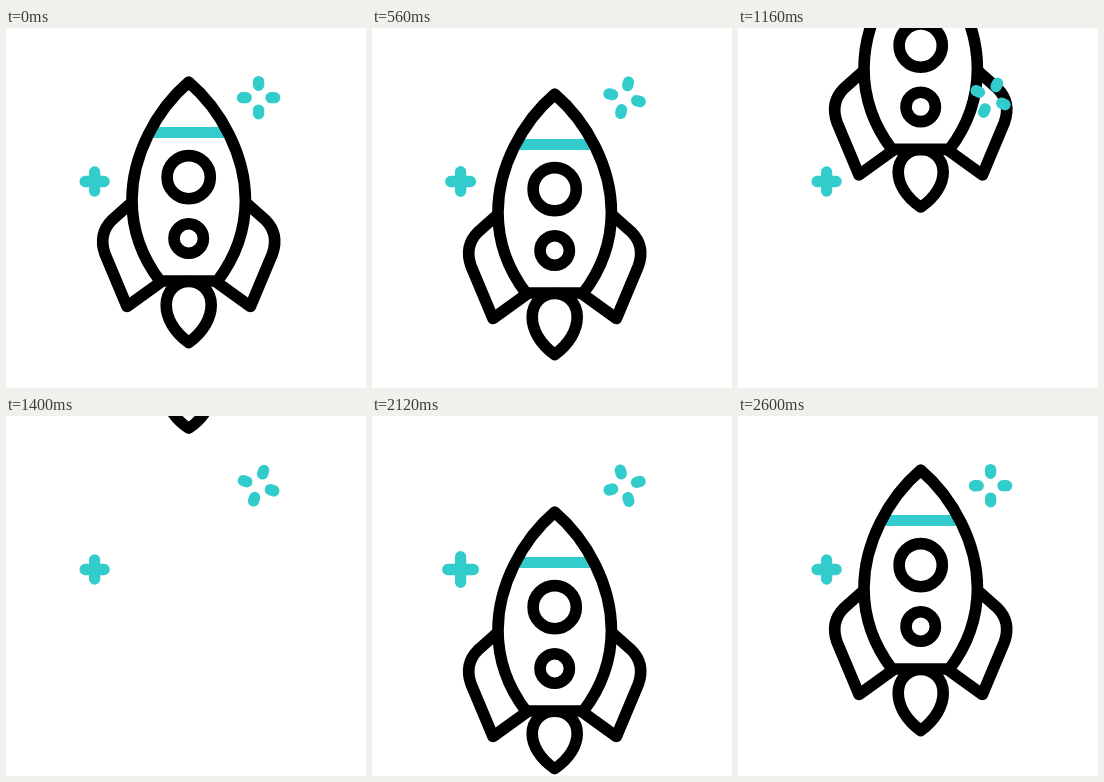
Animation of 360x360 px, one loop 2.76 s. Source, as an HTML page:

```html
<!DOCTYPE html>
<html lang="en">
<head>
<meta charset="utf-8">
<title>Rocket</title>
<style>
  html, body { margin: 0; width: 100%; height: 100%; overflow: hidden; background: #fff; }
  svg { display: block; width: 100%; height: 100%; }
</style>
</head>
<body>
<svg viewBox="0 0 360 360" fill="none" stroke="#000" stroke-width="11.6" stroke-linecap="round" stroke-linejoin="round">
  <g id="rocket">
    <path d="M147 104.5H218" stroke="#3cc" stroke-width="11" stroke-linecap="butt"/>
    <path d="M182.7 54.2C150 82 126 128 126 172C126 204 138 232 154 253H211.4C227.4 232 239.4 204 239.4 172C239.4 128 215.4 82 182.7 54.2Z"/>
    <path id="fin" d="M124 176L106 192Q92 206 99 226L121 278.5L155 254"/>
    <use href="#fin" transform="matrix(-1 0 0 1 365.4 0)"/>
    <circle cx="182.7" cy="149.2" r="21.6"/>
    <circle cx="182.7" cy="210.5" r="14.7"/>
    <path id="flame" d="M182.7 314.5C168.2 304 160.2 290 160.2 277C160.2 263 170.2 253.5 182.7 253.5C195.2 253.5 205.2 263 205.2 277C205.2 290 197.2 304 182.7 314.5Z"/>
  </g>
  <g stroke="#3cc" stroke-width="11.3">
    <path id="plus"/>
    <path id="spark" d="M0 -16.1V-12.4M0 16.1V12.4M-16.1 0H-12.4M16.1 0H12.4"/>
  </g>
</svg>
<script>
const LOOP = 2760, STEP = 40, END = 2600;
const [rocket, flame, plus, spark] =
  ['rocket', 'flame', 'plus', 'spark'].map(id => document.getElementById(id));

const smooth = (a, b, t) => {
  const x = Math.min(1, Math.max(0, (t - a) / (b - a)));
  return x * x * (3 - 2 * x);
};

// Dip and launch off the top, then return from below and settle.
function rocketY(t) {
  const s = t / 1000;
  if (t < 1500) return 165.3 * s ** 2 - 226.8 * s ** 3;
  return 207 * Math.max(0, (2460 - t) / 660) ** 2.405;
}

// One full turn, eased in and out.
function sparkAngle(t) {
  const x = t / 1350;
  return 180 * (x < 1 ? x ** 2.9 : 2 - (2 - x) ** 2.9);
}

// Half length of the plus arms, stretched once every half turn.
function plusArm(t) {
  const x = (t % 1350 - 540) / 620;
  return 9.5 + (x > 0 && x < 1 ? 3.6 * Math.sin(Math.PI * x) : 0);
}

function draw(t) {
  rocket.setAttribute('transform', `translate(0 ${rocketY(t)})`);
  const squash = 1 - 0.06 * (smooth(880, 1160, t) - smooth(2120, 2480, t));
  flame.setAttribute('transform', `translate(0 253) scale(1 ${squash}) translate(0 -253)`);
  const arm = plusArm(t);
  plus.setAttribute('d', `M${88.6 - arm} 153.5h${2 * arm}M88.6 ${153.5 - arm}v${2 * arm}`);
  spark.setAttribute('transform', `translate(252.6 69.7) rotate(${sparkAngle(t)})`);
}

const start = performance.now();
function tick() {
  const t = (performance.now() - start) % LOOP;
  draw(Math.min(END, Math.floor(t / STEP) * STEP));
  requestAnimationFrame(tick);
}
tick();
</script>
</body>
</html>
```
